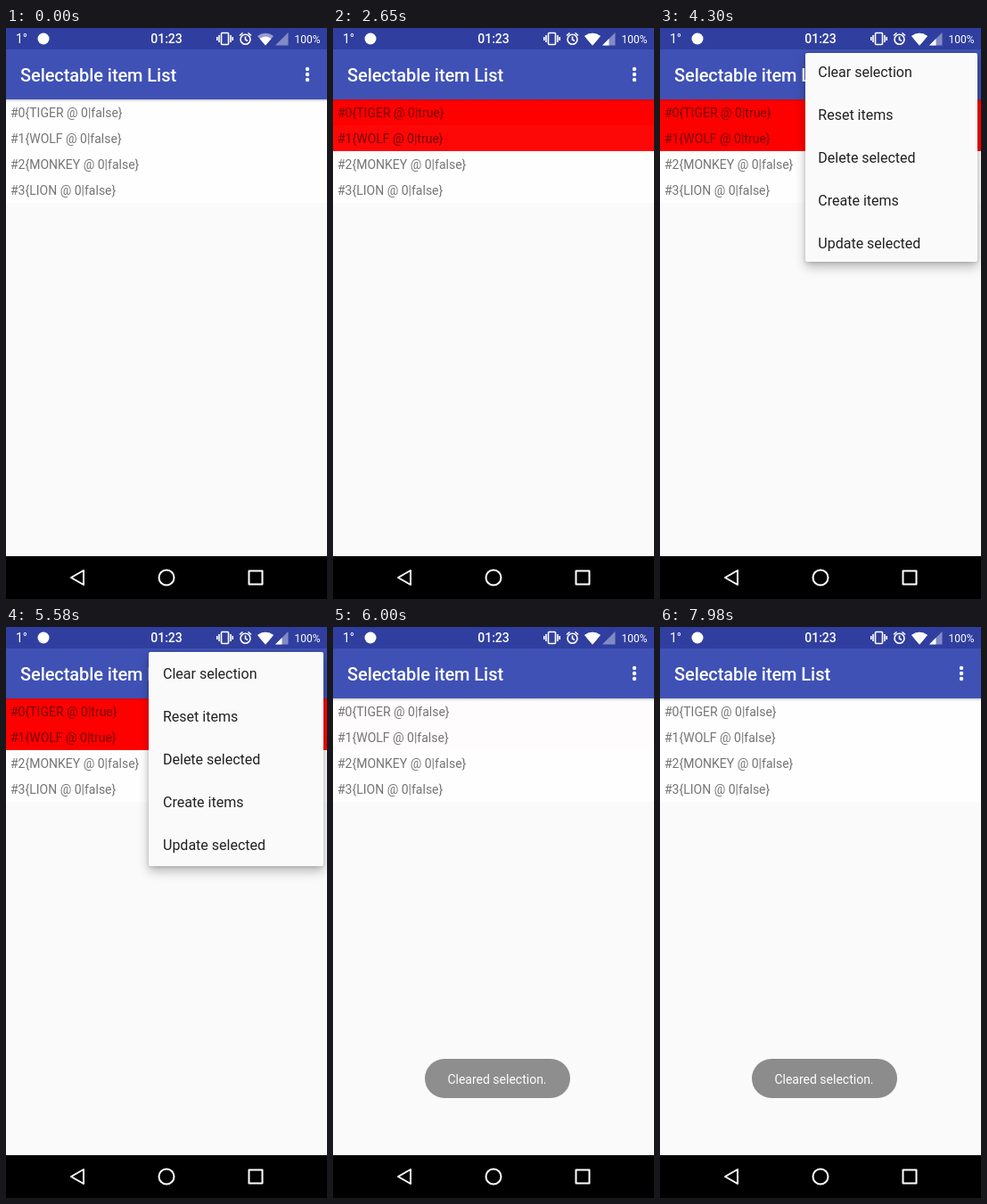
An HTML page for the animation above (8 s loop, 360 by 640 pixels).

```html
<!DOCTYPE html>
<html lang="en">
<head>
<meta charset="utf-8">
<title>Selectable item list</title>
<style>
  @property --x { syntax: "<number>"; inherits: true; initial-value: 0; }
  @property --y { syntax: "<number>"; inherits: true; initial-value: 0; }

  html, body { margin: 0; width: 100%; height: 100%; overflow: hidden; }
  body { position: relative; background: #fafafa; font-family: Roboto, sans-serif; }
  svg { position: absolute; left: 0; top: 0; display: block; }
  .anim, .card, .ripple { animation: 8s linear infinite; }

  .bar { fill: #fff; }
  .title { font-size: 20px; font-weight: 500; letter-spacing: -.08px; }
  .line { fill: none; stroke: #fff; stroke-width: 1.6; }
  .nav { fill: none; stroke: #fff; stroke-width: 2; stroke-linejoin: round; }
  .rows { font-size: 14px; fill: #757575; }
  .red text { fill: #750000; font-size: 14px; }

  /* status icons */
  .wifi { animation-name: wifi; }
  .signal { animation-name: signal; }
  @keyframes wifi { 0%, 6.24% { opacity: 0 } 6.25%, 100% { opacity: 1 } }
  @keyframes signal {
    0%, 25.87% { opacity: 0 } 25.88%, 70% { opacity: 1 }
    70.01%, 90.49% { opacity: 0 } 90.5%, 100% { opacity: 1 }
  }

  /* row selection */
  .first { animation-name: first; }
  .second { animation-name: second; }
  @keyframes first {
    0%, 13.25% { opacity: 0; animation-timing-function: ease-in-out }
    18.25%, 71.25% { opacity: 1; animation-timing-function: ease-in-out }
    75.25%, 100% { opacity: 0 }
  }
  @keyframes second {
    0%, 28.75% { opacity: 0; animation-timing-function: ease-in-out }
    33.75%, 71.25% { opacity: 1; animation-timing-function: ease-in-out }
    75.25%, 100% { opacity: 0 }
  }

  /* overflow menu grows out of its button, x ahead of y */
  .card {
    position: absolute; right: calc(100% - 356px); top: 28px;
    width: calc(38px + 158px * var(--x));
    height: calc(48px + 192px * var(--y));
    overflow: hidden; border-radius: 2px; background: #fafafa;
    box-shadow: 0 6px 12px rgba(0, 0, 0, .25), 0 1px 4px rgba(0, 0, 0, .16);
    animation-name: growX, growY, cardFade;
  }
  .items {
    position: absolute; right: 0; top: 0; width: 196px;
    transform: translate(calc(80px * (1 - var(--x))), calc(-96px * (1 - var(--y))));
  }
  .item {
    position: relative; height: 48px; line-height: 49px; padding-left: 16px;
    font-size: 16px; color: #212121; white-space: nowrap; overflow: hidden;
  }
  .ripple { position: absolute; inset: 0; background: #000; animation-name: ripple; }
  @keyframes growX {
    0%, 50.75% { --x: 0; animation-timing-function: cubic-bezier(.28, 0, .05, 1) }
    54.5%, 100% { --x: 1 }
  }
  @keyframes growY {
    0%, 50.75% { --y: 0; animation-timing-function: cubic-bezier(.6, 0, .3, 1) }
    54.5%, 100% { --y: 1 }
  }
  @keyframes cardFade {
    0%, 51.06% { opacity: 0 } 53.5%, 71.5% { opacity: 1 } 74.75%, 100% { opacity: 0 }
  }
  @keyframes ripple { 0%, 69.8% { opacity: 0 } 71.5%, 100% { opacity: .12 } }

  /* toast */
  .toast { animation-name: toast; }
  @keyframes toast {
    0%, 72.63% { opacity: 0; animation-timing-function: cubic-bezier(.33, .67, .67, 1) }
    78.88%, 95.9% { opacity: 1; animation-timing-function: cubic-bezier(.33, 0, .67, .33) }
    100% { opacity: .58 }
  }
</style>
</head>
<body>
<svg width="360" height="640" viewBox="0 0 360 640">
  <defs>
    <linearGradient id="shade" x2="0" y2="1">
      <stop stop-color="#333" stop-opacity=".25"/>
      <stop offset="1" stop-color="#333" stop-opacity="0"/>
    </linearGradient>
  </defs>

  <rect y="80" width="360" height="116" fill="#fefefe"/>
  <g class="rows">
    <text x="5" y="100">#0{TIGER @ 0|false}</text>
    <text x="5" y="129">#1{WOLF @ 0|false}</text>
    <text x="5" y="158">#2{MONKEY @ 0|false}</text>
    <text x="5" y="187">#3{LION @ 0|false}</text>
  </g>
  <g class="red anim first">
    <rect y="80" width="360" height="29" fill="#f00"/>
    <text x="5" y="100">#0{TIGER @ 0|true}</text>
  </g>
  <g class="red anim second">
    <rect y="109" width="360" height="29" fill="#f00"/>
    <text x="5" y="129">#1{WOLF @ 0|true}</text>
  </g>

  <rect width="360" height="24" fill="#303f9f"/>
  <rect y="24" width="360" height="56" fill="#3f51b5"/>
  <rect y="80" width="360" height="3" fill="url(#shade)"/>

  <g class="bar">
    <text x="11" y="17" font-size="14">1°</text>
    <circle cx="42" cy="12" r="6.5"/>
    <text x="180" y="17" font-size="14" font-weight="500" text-anchor="middle">01:23</text>
    <text x="323.5" y="17" font-size="12">100%</text>
    <text class="title" x="16" y="59.5">Selectable item List</text>
    <circle cx="338" cy="46" r="2.2"/>
    <circle cx="338" cy="52" r="2.2"/>
    <circle cx="338" cy="58" r="2.2"/>
    <path d="M282 9Q291 2.5 300 9L291 19.5Z" opacity=".5"/>
    <path d="M284.5 12Q291 7 297.5 12L291 19.5Z"/>
    <path class="anim wifi" d="M282 9Q291 2.5 300 9L291 19.5Z"/>
    <path d="M302 19.5L316.5 5V19.5Z" opacity=".4"/>
    <path class="anim signal" d="M302 19.5L309.5 12V19.5Z"/>
  </g>
  <g class="line">
    <rect x="241.5" y="5.5" width="8" height="13" rx="1"/>
    <path d="M239 8V16M236.8 10V14M252 8V16M254.2 10V14"/>
    <circle cx="268.5" cy="12.7" r="5.5"/>
    <path d="M268.5 9.5V13L271 14.5M262 8.5L265.5 5.5M275 8.5L271.5 5.5"/>
  </g>

  <rect y="592" width="360" height="48"/>
  <g class="nav">
    <path d="M73 616L87 608V624Z"/>
    <circle cx="180" cy="616" r="8.5"/>
    <rect x="272.5" y="608.5" width="15" height="15"/>
  </g>

  <g class="anim toast">
    <rect x="103" y="484" width="163" height="44" rx="22" fill="#4c4c4c"/>
    <text x="184" y="511.5" font-size="14" text-anchor="middle" fill="#fff">Cleared selection.</text>
  </g>
</svg>

<div class="card">
  <div class="items">
    <div class="item"><i class="ripple"></i>Clear selection</div>
    <div class="item">Reset items</div>
    <div class="item">Delete selected</div>
    <div class="item">Create items</div>
    <div class="item">Update selected</div>
  </div>
</div>
</body>
</html>
```
